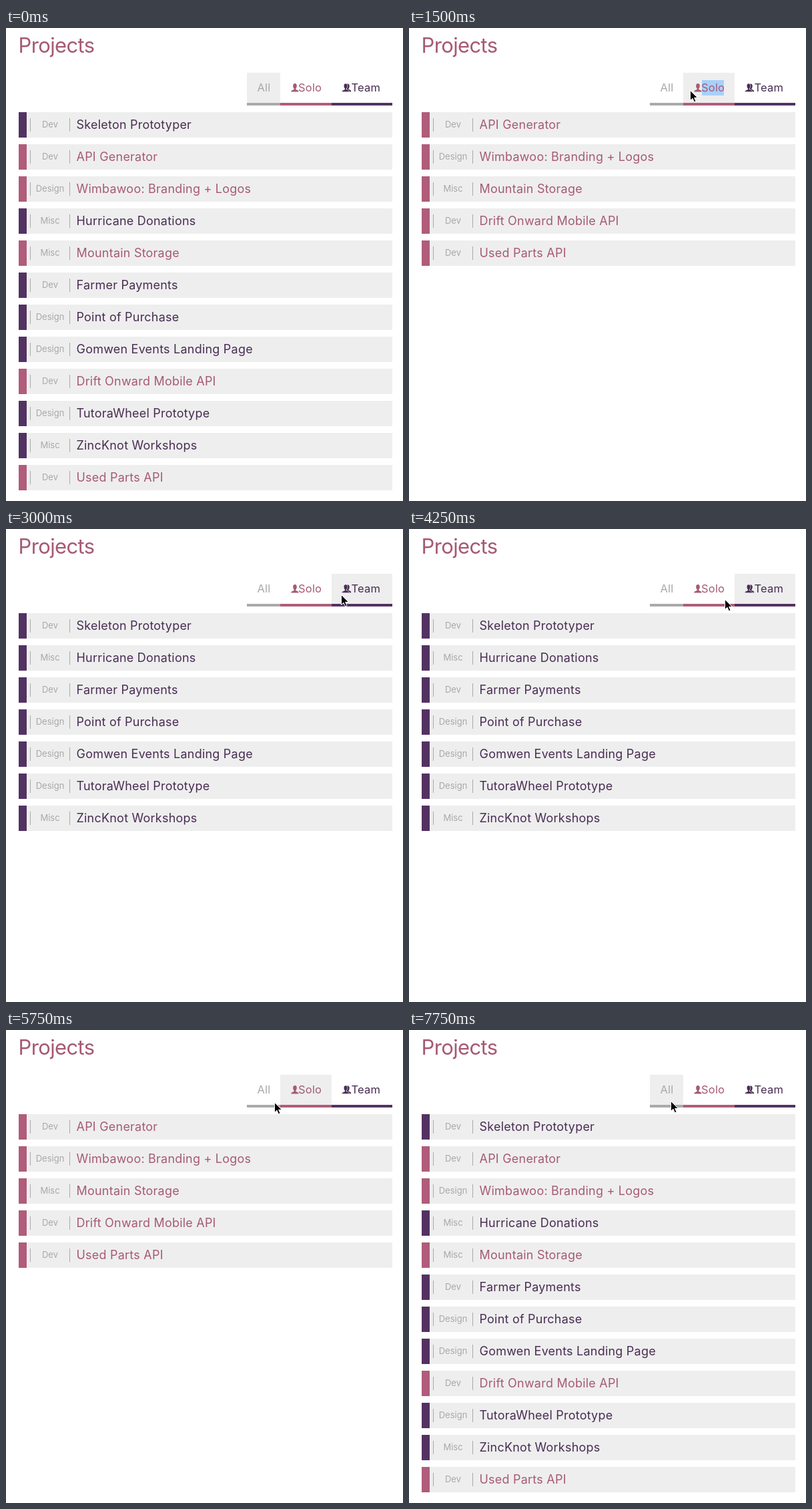
Recreate the animation shown at these times as an HTML page. Size 595 by 708 pixels, loop 8 s.

```html
<!DOCTYPE html>
<html lang="en">
<head>
<meta charset="utf-8">
<title>Projects</title>
<style>
  html, body { margin: 0; width: 100%; height: 100%; overflow: hidden; background: #fff; }
  svg { display: block; font-family: Inter, "Open Sans", sans-serif; font-size: 18px; letter-spacing: .012em; }
  .title { font-size: 31px; letter-spacing: -.02em; }
  .tab { font-size: 16.5px; }
  .tag { font-size: 13px; letter-spacing: 0; text-anchor: middle; fill: #a8a8a8; }
</style>
</head>
<body>
<svg width="595" height="708" viewBox="0 0 595 708">
  <defs>
    <path id="person" d="M6 0C7.8 0 8.8 1.4 8.8 3.5C8.8 5.5 8.1 6.9 7.3 7.8V9C9 10 11.7 10 11.7 12.6H.3C.3 10 3 10 4.7 9V7.8C3.9 6.9 3.2 5.5 3.2 3.5C3.2 1.4 4.2 0 6 0Z"/>
  </defs>
  <text class="title" x="18.5" y="37" fill="#a65a74">Projects</text>
  <g id="tabs"></g>
  <g id="rows"></g>
  <path id="cursor" d="M.5 .5V15.5L4 12.3L6.4 17.8L9 16.7L6.6 11.4H11.4Z" fill="#000" stroke="#fff"/>
</svg>
<script>
const LOOP = 8000;
const COLORS = {
  all: { bar: '#aaa', text: '#a8a8a8' },
  solo: { bar: '#b05c7a', text: '#a65a74' },
  team: { bar: '#533262', text: '#482d52' }
};
const PROJECTS = [
  ['team', 'Dev', 'Skeleton Prototyper'],
  ['solo', 'Dev', 'API Generator'],
  ['solo', 'Design', 'Wimbawoo: Branding + Logos'],
  ['team', 'Misc', 'Hurricane Donations'],
  ['solo', 'Misc', 'Mountain Storage'],
  ['team', 'Dev', 'Farmer Payments'],
  ['team', 'Design', 'Point of Purchase'],
  ['team', 'Design', 'Gomwen Events Landing Page'],
  ['solo', 'Dev', 'Drift Onward Mobile API'],
  ['team', 'Design', 'TutoraWheel Prototype'],
  ['team', 'Misc', 'ZincKnot Workshops'],
  ['solo', 'Dev', 'Used Parts API']
];
const TABS = [
  { kind: 'all', label: 'All', x: 361, w: 50, textX: 376.5 },
  { kind: 'solo', label: 'Solo', x: 411, w: 77, textX: 438 },
  { kind: 'team', label: 'Team', x: 488, w: 91, textX: 517.5 }
];
// [start ms, filter]
const FILTERS = [[0, 'all'], [1500, 'solo'], [3000, 'team'], [4500, 'solo'], [6000, 'all']];
// [start ms, tip x, tip y]
const POINTER = [
  [250, 362, 50], [500, 401, 82], [750, 410, 90], [1000, 411, 91], [1250, 421, 93],
  [1750, 425, 91], [2000, 440, 94], [2250, 411, 95], [2500, 394, 96], [2750, 496, 98],
  [3000, 502, 98], [4000, 499, 100], [4250, 473, 105], [4500, 469, 105], [5500, 460, 107],
  [5750, 402, 108], [6000, 390, 108], [7500, 387, 109], [7750, 392, 106]
];

const $ = id => document.getElementById(id);
const rect = (x, y, w, h, fill) =>
  `<rect x="${x}" y="${y}" width="${w}" height="${h}" fill="${fill}"/>`;
const text = (x, y, label, attrs) => `<text x="${x}" y="${y}" ${attrs}>${label}</text>`;
const latest = (steps, t) => steps.filter(s => s[0] <= t).pop();

function icon(kind, back) {
  if (kind === 'all') return '';
  if (kind === 'solo') return '<use href="#person" x="427" y="83"/>';
  return '<use href="#person" transform="translate(507 83.5) scale(.88 .93)"/>' +
    `<use href="#person" x="503" y="83" stroke="${back}" stroke-width=".6"/>`;
}

function drawTab({ kind, label, x, w, textX }, filter, selected) {
  const { bar, text: color } = COLORS[kind];
  const back = kind === filter ? '#eee' : '#fff';
  return rect(x, 67, w, 45, back) +
    (selected && kind === 'solo' ? rect(439, 78, 33, 23, '#a9d0fb') : '') +
    rect(x, 112, w, 4, bar) +
    `<g fill="${color}">${icon(kind, back)}${text(textX, 95, label, 'class="tab"')}</g>`;
}

function drawRow([kind, tag, name], i) {
  const y = 126 + 48 * i;
  const { bar, text: color } = COLORS[kind];
  return rect(19, y, 560, 38, '#eee') + rect(19, y, 12, 38, bar) +
    rect(36, y + 9, 1, 20, '#aaa') + rect(95, y + 9, 1, 20, '#aaa') +
    text(66, y + 23, tag, 'class="tag"') + text(105.5, y + 25, name, `fill="${color}"`);
}

let shown = '';
function render(t) {
  const filter = latest(FILTERS, t)[1];
  const selected = t >= 1500 && t < 3000;
  const state = filter + selected;
  if (state !== shown) {
    shown = state;
    $('tabs').innerHTML = TABS.map(tab => drawTab(tab, filter, selected)).join('');
    $('rows').innerHTML = PROJECTS
      .filter(p => filter === 'all' || p[0] === filter).map(drawRow).join('');
  }
  const tip = latest(POINTER, t);
  $('cursor').setAttribute('visibility', tip ? 'visible' : 'hidden');
  if (tip) $('cursor').setAttribute('transform', `translate(${tip[1]} ${tip[2]})`);
}

const start = performance.now();
function tick() {
  render((performance.now() - start) % LOOP);
  requestAnimationFrame(tick);
}
tick();
</script>
</body>
</html>
```
